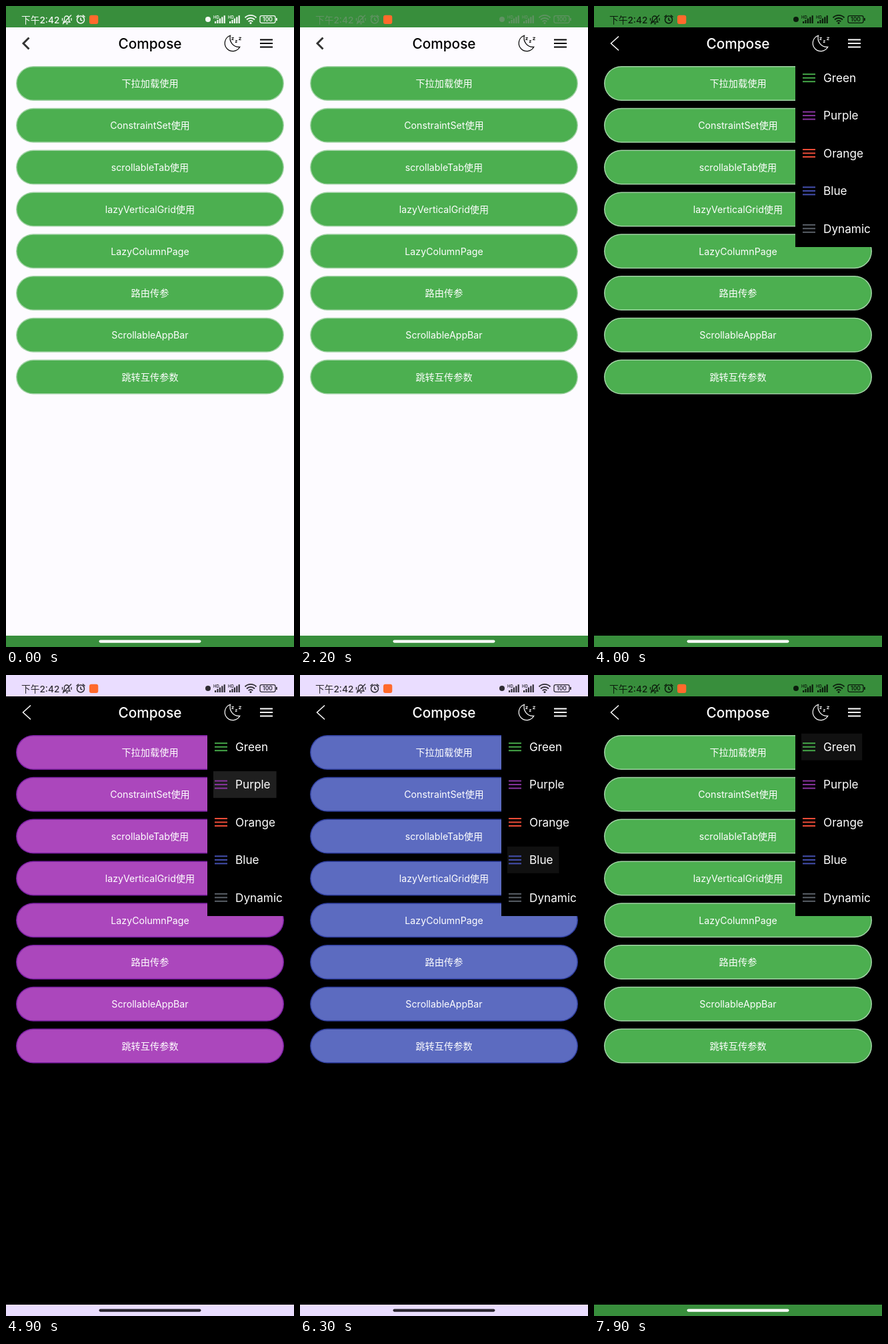
These frames come from a looping animation (432x960 px, 8000 ms). An HTML page with a canvas:

```html
<!DOCTYPE html>
<html lang="zh-CN">
<head>
<meta charset="utf-8">
<title>Theme switcher</title>
<style>
html, body { margin: 0; width: 100%; height: 100%; overflow: hidden; background: #000; }
canvas { display: block; width: 432px; height: 960px; }
</style>
</head>
<body>
<canvas id="stage" width="432" height="960"></canvas>
<script>
const ctx = document.getElementById('stage').getContext('2d');
const LOOP = 8000, MENU_OPEN = 3700, TINT_MS = 200;
const FONT = 'Inter, "Noto Sans CJK SC", "Noto Sans CJK", sans-serif';
const LABELS = ['下拉加载使用', 'ConstraintSet使用', 'scrollableTab使用', 'lazyVerticalGrid使用',
  'LazyColumnPage', '路由传参', 'ScrollableAppBar', '跳转互传参数'];
const MENU = [['Green', '#45a849'], ['Purple', '#8a35a0'], ['Orange', '#ee4c38'],
  ['Blue', '#4550b0'], ['Dynamic', '#5a6068']];

const green = { bar: '#388e3c', bg: '#000', panel: '#000', fill: '#4caf50', edge: '#a0d2a4', label: '#fff' };
const lavender = { ...green, bar: '#eaddff', pale: true };
const themes = {
  light: { ...green, bg: '#fdfbff', light: true },
  green,
  purple: { ...lavender, fill: '#ab47bc', edge: '#7b1fa2' },
  orange: { ...lavender, fill: '#ff7350', edge: '#c4301a' },
  blue: { ...lavender, fill: '#5c6bc0', edge: '#303f9f' },
  dynamic: { bar: '#d8e2ff', bg: '#1b1b1f', panel: '#18181b', fill: '#adc6ff', edge: '#52658f', label: '#fff', pale: true },
};
// time, theme, tapped menu row
const STEPS = [[0, 'light'], [1190, 'green'], [2080, 'light'], [2940, 'green'], [4700, 'purple', 1],
  [5500, 'orange', 2], [6250, 'blue', 3], [6880, 'dynamic', 4], [7560, 'green', 0]];

const clamp = v => Math.max(0, Math.min(1, v));

function text(str, x, y, size, color, { align = 'left', weight = 400 } = {}) {
  ctx.font = `${weight} ${size}px ${FONT}`;
  ctx.textAlign = align;
  ctx.fillStyle = color;
  ctx.fillText(str, x, y);
}
function rect(x, y, w, h, color) {
  ctx.fillStyle = color;
  ctx.fillRect(x, y, w, h);
}
function pill(x, y, w, h, r, color) {
  ctx.beginPath();
  ctx.roundRect(x, y, w, h, r);
  ctx.fillStyle = color;
  ctx.fill();
}
function stroke(d, color, width) {
  ctx.strokeStyle = color;
  ctx.lineWidth = width;
  ctx.stroke(new Path2D(d));
}
function bars(x, y, color, width) {
  for (let i = -1; i < 2; i++) rect(x, y + i * 5.5 - width / 2, 19, width, color);
}

function statusIcons(color) {
  text('下午2:42', 23, 25.5, 13.7, color, { weight: 500 });
  // muted bell
  stroke('M86 24H96L94.5 21.5V18.5A3.5 3.5 0 0 0 87.5 18.5V21.5ZM90 26.5H93M85 27L98 13.5M84.5 18V22M98 18V22', color, 1.3);
  // alarm clock
  stroke('M106.5 20.5A5.5 5.5 0 1 0 117.5 20.5A5.5 5.5 0 1 0 106.5 20.5M112 17.5V21L114.5 22M105.5 16.5L109 13.5M115 13.5L118.5 16.5', color, 1.5);
  pill(299, 16, 8, 8, 4, color);
  for (const x of [311, 333]) {
    text('HD', x, 18.5, 6, color, { weight: 600 });
    for (let i = 0; i < 5; i++) {
      const h = 3 + i * 2.2;
      rect(x + 2 + i * 3.4, 26 - h, 2.2, h, color);
    }
  }
  // wifi
  stroke('M358.5 17.5A12 12 0 0 1 375.5 17.5M361 20.5A8.5 8.5 0 0 1 373 20.5M363.7 23.3A4.7 4.7 0 0 1 370.3 23.3', color, 1.8);
  pill(365.5, 24, 3, 3, 1.5, color);
  // battery
  stroke('M383.5 14.7H401.5Q404 14.7 404 17.2V22.8Q404 25.3 401.5 25.3H383.5Q381 25.3 381 22.8V17.2Q381 14.7 383.5 14.7', color, 1.3);
  rect(405, 18, 1.8, 4, color);
  text('100', 392.5, 23.4, 8.6, color, { align: 'center', weight: 600 });
}

function header(theme) {
  const ink = theme.light ? '#000' : '#fff';
  if (theme.light) stroke('M34.5 47.5L26 56L34.5 64.5', '#333', 2.9);
  else stroke('M37 45.5L25.5 56L37 66.5', ink, 1.5);
  text('Compose', 216, 64, 20.8, ink, { align: 'center', weight: 500 });
  // crescent moon with three z's
  stroke('M336.5 44.2A12 12 0 1 0 350.8 61.3A13.5 13.5 0 0 1 336.5 44.2Z', ink, 1.2);
  for (const [x, y, s] of [[338.5, 47.5, 3], [344, 51.8, 2.6], [349.3, 47.2, 3.4]])
    stroke(`M${x} ${y}h${s}l${-s} ${s}h${s}`, ink, 1);
  bars(381, 56, ink, 2);
}

function buttons(theme) {
  LABELS.forEach((label, i) => {
    const y = 90 + i * 62.8;
    pill(15, y, 402, 52, 26, theme.edge);
    pill(16.5, y + 1.5, 399, 49, 24.5, theme.fill);
    text(label, 216, y + 31.3, 14.2, theme.label, { align: 'center' });
  });
}

function menu(theme, t, tapped, age) {
  const p = clamp((t - MENU_OPEN) / 120);
  if (!p) return;
  const scale = 0.8 + 0.2 * p;
  ctx.save();
  ctx.globalAlpha = p;
  ctx.translate(432, 80);
  ctx.scale(scale, scale);
  ctx.translate(-432, -80);
  rect(302, 80, 130, 281, theme.panel);
  MENU.forEach(([name, color], i) => {
    const y = 107.7 + i * 56.4;
    ctx.font = `400 17.2px ${FONT}`;
    if (i === tapped) {
      const glow = 0.12 * clamp(age / 100) * clamp((450 - age) / 200);
      rect(311, y - 20, 42 + ctx.measureText(name).width, 40, `rgba(255,255,255,${glow})`);
    }
    const tint = theme === themes.dynamic && i === 4 ? '#5f6cae' : color;
    bars(313, y, tint, 2);
    text(name, 344, y + 6.3, 17.2, '#fff');
  });
  ctx.restore();
}

function draw(t) {
  const [start, name, tapped] = STEPS.findLast(s => s[0] <= t);
  const theme = themes[name], age = t - start;
  rect(0, 0, 432, 960, theme.bg);
  rect(0, 0, 432, 32, theme.bar);
  rect(0, 943, 432, 17, theme.bar);
  pill(139.5, 949.5, 153, 4.2, 2.1, theme.pale ? '#29252f' : '#fff');

  // status tint crosses between white and dark after a light/dark toggle
  const toggled = start > 0 && start < MENU_OPEN;
  const p = toggled ? clamp(age / TINT_MS) : 1;
  const dark = theme.light ? 1 - p : p;
  const gray = Math.round(255 * (1 - dark));
  const alpha = 0.2 + 0.6 * Math.abs(2 * dark - 1) + 0.15 * (1 - dark);
  statusIcons(`rgba(${gray},${gray},${gray},${alpha})`);
  pill(125, 13.7, 13.3, 13.3, 3, '#ff6a2c');

  header(theme);
  buttons(theme);
  menu(theme, t, tapped, age);
}

const begin = performance.now();
function tick() {
  draw((performance.now() - begin) % LOOP);
  requestAnimationFrame(tick);
}
tick();
</script>
</body>
</html>
```
